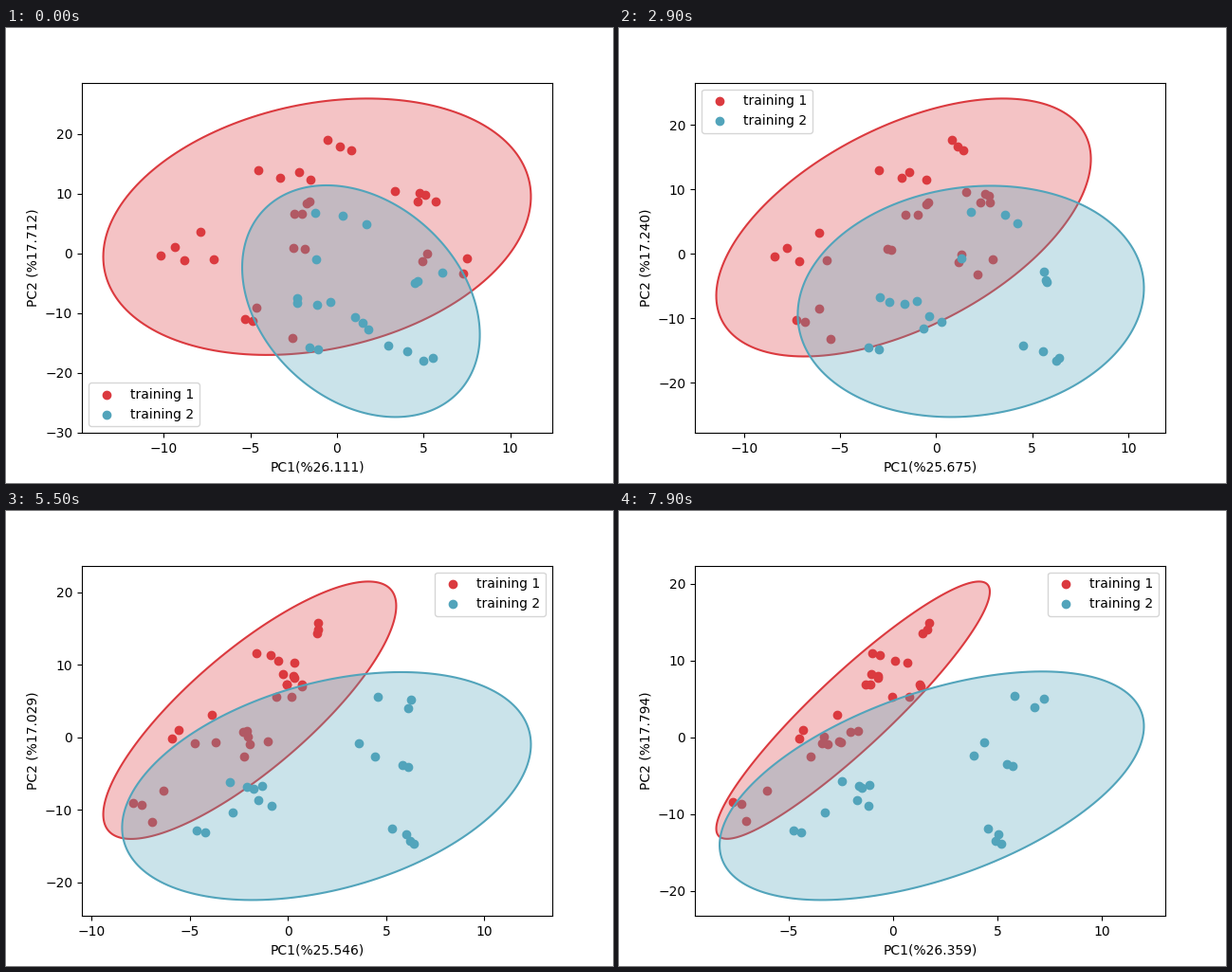
A matplotlib script for the animation above (8000 ms loop, 640 px wide and 480 px high).

```python
import matplotlib.pyplot as plt
import numpy as np
from matplotlib.animation import FuncAnimation

STEP, LOOP = 100, 8000
END = LOOP - STEP
RED, BLUE = "#db3a3f", "#52a4bb"
LEFT, TOP, WIDTH, HEIGHT = 80, 57.6, 496, 369.6  # axes box on the stage

# time: left, right, bottom, top, correlation of each confidence ellipse
RED_KEYS = {
    0: (-13.49, 11.20, -16.98, 25.97, 0.235),
    1000: (-13.12, 10.52, -16.86, 25.74, 0.315),
    2900: (-11.45, 8.05, -15.88, 24.13, 0.53),
    4400: (-10.42, 6.65, -15.20, 23.21, 0.70),
    5500: (-9.41, 5.51, -14.02, 21.50, 0.81),
    6700: (-9.19, 5.15, -13.74, 21.07, 0.822),
    7100: (-8.56, 4.95, -13.55, 20.85, 0.855),
    7900: (-8.48, 4.64, -13.23, 20.32, 0.921),
}
BLUE_KEYS = {
    0: (-5.47, 8.25, -27.38, 11.43, -0.29),
    1000: (-5.68, 8.84, -26.96, 11.29, -0.155),
    2900: (-7.21, 10.81, -25.28, 10.59, 0.115),
    4400: (-7.91, 11.78, -24.25, 10.08, 0.255),
    5500: (-8.45, 12.37, -22.45, 9.00, 0.365),
    6700: (-7.86, 11.88, -22.15, 9.12, 0.41),
    7100: (-7.92, 11.62, -21.85, 8.95, 0.445),
    7900: (-8.32, 12.03, -21.21, 8.59, 0.52),
}
SHARE_KEYS = {
    0: (26.111, 17.712), 1000: (26.042, 17.585), 2900: (25.675, 17.240),
    4400: (25.420, 17.050), 5500: (25.546, 17.029), 6700: (26.131, 17.497),
    7900: (26.359, 17.794),
}

# each dot on the stage: first x, last x, height
RED_DOTS = [
    (339, 327, 118), (352, 325, 125), (364, 320, 129), (266, 267, 150),
    (289, 291, 158), (309, 275, 152), (321, 304, 160), (410, 266, 172),
    (436, 273, 174), (442, 273, 176), (434, 265, 183), (453, 260, 183),
    (317, 318, 185), (320, 317, 183), (304, 288, 196), (312, 306, 196),
    (205, 230, 215), (178, 194, 231), (163, 190, 240), (188, 214, 245),
    (219, 234, 244), (303, 252, 232), (315, 244, 233), (444, 216, 238),
    (439, 220, 246), (486, 232, 243), (482, 202, 259), (264, 156, 295),
    (252, 120, 307), (260, 129, 309), (302, 134, 327),
]
BLUE_DOTS = [
    (326, 417, 195), (355, 448, 198), (380, 438, 207), (327, 385, 244),
    (307, 235, 285), (307, 253, 290), (328, 256, 292), (342, 264, 289),
    (368, 251, 305), (376, 263, 311), (382, 217, 318), (320, 184, 337),
    (329, 192, 339), (403, 389, 335), (423, 400, 341), (440, 403, 351),
    (450, 397, 348), (431, 415, 269), (434, 409, 267), (460, 374, 258),
]


def spline(keys):
    """Smooth path through {time: values}."""
    ts = np.array(list(keys), float)
    vs = np.array(list(keys.values()))
    slopes = np.gradient(vs, ts, axis=0)

    def at(t):
        i = min(np.searchsorted(ts, t, side="right"), len(ts) - 1) - 1
        h = ts[i + 1] - ts[i]
        u = (t - ts[i]) / h
        w = u * u * (3 - 2 * u)
        return (vs[i] * (1 - w) + vs[i + 1] * w
                + h * u * (1 - u) * ((1 - u) * slopes[i] - u * slopes[i + 1]))

    return at


red_box, blue_box, share = map(spline, (RED_KEYS, BLUE_KEYS, SHARE_KEYS))


def limits(t):
    """Axis limits around both ellipses with a 5 % margin."""
    a, b = red_box(t), blue_box(t)
    x0, x1 = min(a[0], b[0]), max(a[1], b[1])
    y0, y1 = min(a[2], b[2]), max(a[3], b[3])
    mx, my = (x1 - x0) / 20, (y1 - y0) / 20
    return x0 - mx, x1 + mx, y0 - my, y1 + my


def from_unit(u, v, box):
    """Map unit-circle coordinates into an ellipse."""
    left, right, bottom, top, corr = box
    x = (left + right + (right - left) * (corr * v + np.sqrt(1 - corr**2) * u)) / 2
    return x, (bottom + top + (top - bottom) * v) / 2


def to_unit(px, py, t, box):
    """Map stage positions to the unit circle of an ellipse."""
    x0, x1, y0, y1 = limits(t)
    x = x0 + (px - LEFT) / WIDTH * (x1 - x0)
    y = y1 - (py - TOP) / HEIGHT * (y1 - y0)
    left, right, bottom, top, corr = box
    v = (2 * y - bottom - top) / (top - bottom)
    u = ((2 * x - left - right) / (right - left) - corr * v) / np.sqrt(1 - corr**2)
    return np.array([u, v])


class Group:
    """Dots that ride on their ellipse while drifting inside it."""

    def __init__(self, dots, box, ease, color, label):
        first, last, height = np.transpose(dots)
        self.start = to_unit(first, height, 0, box(0))
        self.end = to_unit(last, height, END, box(END))
        self.box, self.ease = box, ease
        self.color, self.label = color, label

    def draw(self, t):
        box, k = self.box(t), self.ease(t / END)
        dots = self.start + (self.end - self.start) * k
        ax.scatter(*from_unit(*dots, box), color=self.color, label=self.label)
        ax.fill(*from_unit(np.cos(turn), np.sin(turn), box),
                facecolor=(self.color, 0.3), edgecolor=self.color, lw=1.5)


def ease_in(u):
    return u * u


def ease_out(u):
    return np.sin(u * np.pi / 2)


def legend_place(t):
    if t < 2100:
        return "lower left"
    return "upper left" if t < 3600 else "upper right"


fig, ax = plt.subplots(figsize=(6.4, 4.8), dpi=100)
turn = np.linspace(0, 2 * np.pi, 200)
groups = [
    Group(RED_DOTS, red_box, ease_in, RED, "training 1"),
    Group(BLUE_DOTS, blue_box, ease_out, BLUE, "training 2"),
]


def draw(frame):
    t = frame * STEP
    ax.clear()
    for group in groups:
        group.draw(t)
    x0, x1, y0, y1 = limits(t)
    ax.set(xlim=(x0, x1), ylim=(y0, y1))
    pc1, pc2 = share(t)
    ax.set_xlabel(f"PC1(%{pc1:.3f})")
    ax.set_ylabel(f"PC2 (%{pc2:.3f})")
    ax.legend(loc=legend_place(t))


anim = FuncAnimation(fig, draw, frames=LOOP // STEP, interval=STEP,
                     init_func=lambda: None, repeat=True, repeat_delay=0)
plt.show()
```
